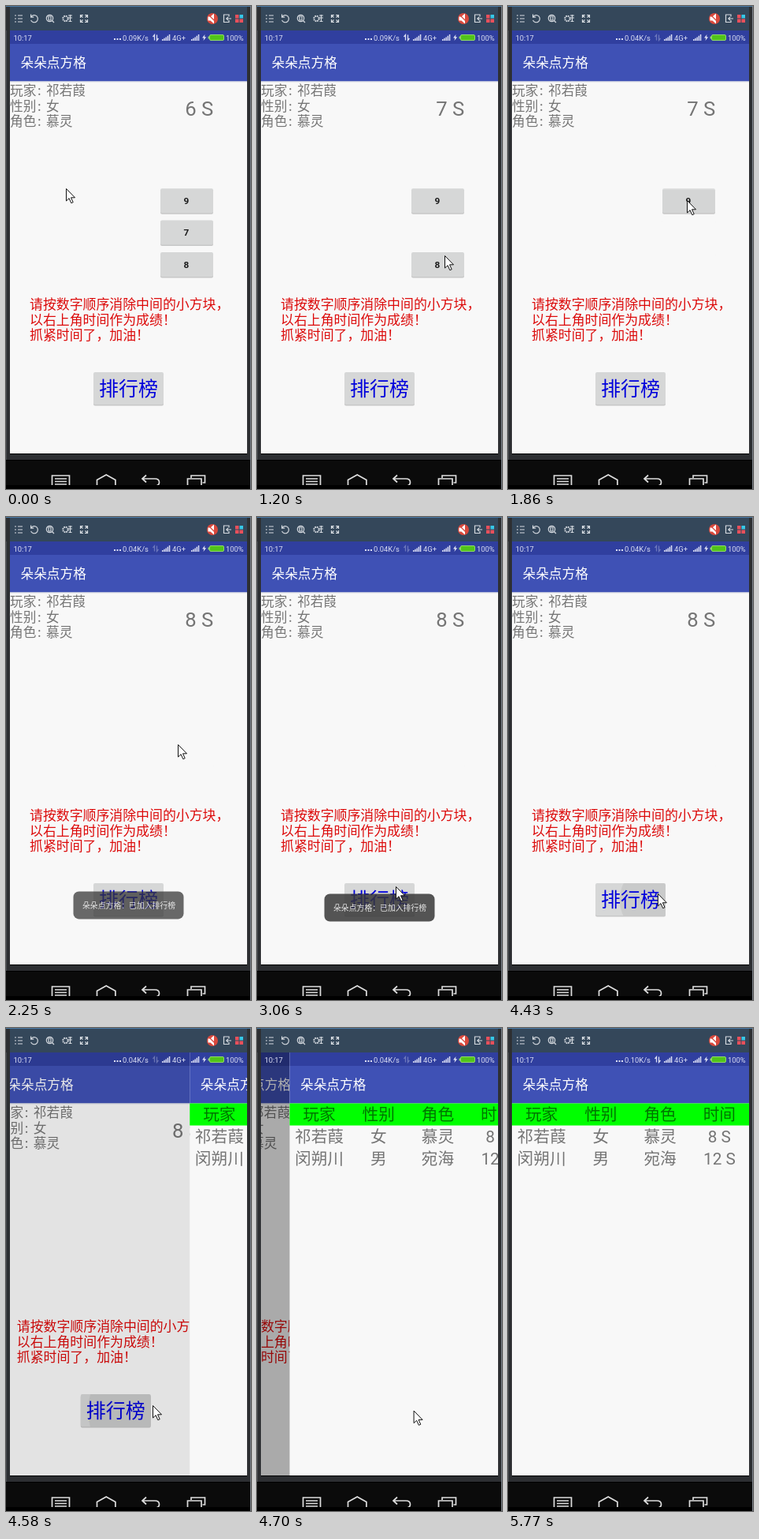
Write an HTML page that moves like this. It is 311 px wide and 612 px high and loops after 5890 ms.

```html
<!DOCTYPE html>
<html lang="zh-CN">
<head>
<meta charset="utf-8">
<title>朵朵点方格</title>
<style>
  html, body { margin: 0; width: 100%; height: 100%; overflow: hidden; background: #2d2f32; }
  svg { display: block; }
  text { font-family: "Noto Sans CJK SC", "Noto Sans CJK", sans-serif; white-space: pre; }
  .latin { font-family: Roboto, "Noto Sans CJK SC", sans-serif; }
  .title { font-size: 16.7px; fill: #fff; }
  .info { font-size: 16.7px; fill: #757575; }
  .hint { font-size: 16.9px; fill: #dc0a0a; }
  .count { font-size: 25.7px; fill: #757575; }
  .digit { font-size: 11.8px; font-weight: 700; fill: #1c1c1c; text-anchor: middle; }
  .rank { font-size: 25px; fill: #0000dc; }
  .cell { font-size: 20.7px; fill: #757575; text-anchor: middle; }
  .head { fill: #000; fill-opacity: .54; }
  .status { font-size: 9.4px; fill: #dcdff4; }
  .toast { font-size: 9.85px; fill: #e8e8e8; }
  .button { fill: #d6d7d7; }
  .shadow { fill: #000; fill-opacity: .2; }
  .line { fill: none; stroke: #d5dae0; stroke-width: 1.2; }
  .nav { fill: none; stroke: #dedede; stroke-width: 1.7; }
</style>
</head>
<body>
<svg width="311" height="612" viewBox="0 0 311 612">
  <defs>
    <clipPath id="screen"><rect x="5" y="31" width="301" height="536"/></clipPath>
    <clipPath id="rankClip"><rect x="111" y="464" width="89" height="41" rx="2"/></clipPath>
    <clipPath id="navClip"><rect y="575" width="311" height="32"/></clipPath>
    <path id="signal" fill="#dcdff4" d="M0 8V6h1.5v2zM2.2 8V4.8h1.5V8zM4.4 8V3.4h1.5V8zM6.6 8V1.8h1.5V8zM8.8 8V0h1.5v8z"/>
    <g id="bars">
      <path fill="#303f9f" d="M5 31h301v17H5z"/>
      <path fill="#3f51b5" d="M5 48h301v47.5H5z"/>
      <text class="title" x="18.5" y="78">朵朵点方格</text>
    </g>
  </defs>

  <!-- window frame and tools -->
  <path fill="#2d2f32" d="M0 0h311v612H0z"/>
  <path fill="#34475a" d="M5 1h301v30H5z"/>
  <path fill="#4a7ba6" d="M0 0h311v1H0z"/>
  <path fill="#45484d" d="M0 31h1v544H0z"/>
  <path class="line" d="M11 12h2M15 12h6M11 16h2M15 16h6M11 20h2M15 20h6"/>
  <path class="line" d="M32 13.5a4.6 4.6 0 1 1-.4 4.6M31.6 10.5v3.6h3.6"/>
  <g class="line"><circle cx="55.5" cy="15.5" r="4.2"/><path d="M58.5 18.5l2.5 2.5M54 18v-5h3v5z"/></g>
  <g class="line">
    <circle cx="75.5" cy="16" r="3.2" stroke-width="2" stroke-dasharray="1.7 .8"/>
    <path d="M79 12h5M79 15h5M81.5 11v9M79.5 19.5h4"/>
  </g>
  <path class="line" d="M94.5 15v-3.5H98M100 11.5h3.5V15M103.5 17v3.5H100M98 20.5h-3.5V17M95 12l2.5 2.5M103 12l-2.5 2.5M103 20l-2.5-2.5M95 20l2.5-2.5"/>
  <circle cx="262" cy="16" r="7" fill="#d8483c"/>
  <path fill="#fff" d="M256.500 13.500h3l4.500-4v13l-4.500-4h-3z"/>
  <path d="M257 11l10 10" stroke="#d8483c" stroke-width="1.3"/>
  <path class="line" d="M283 13.500V11h-6.500v9.500h6.500V18M286 16h-6M282 13.800L279.800 16l2.200 2.200"/>
  <path fill="#e8505b" d="M291 11h4.500v4.500H291zM291 16.500h4.500V21H291zM296.500 16.500h4.500V21h-4.500z"/>
  <path fill="#35c8e8" d="M296.500 11h4.500v4.500h-4.500z"/>

  <g clip-path="url(#screen)">
    <g id="game">
      <path fill="#f8f8f8" d="M5 31h301v536H5z"/>
      <use href="#bars"/>
      <path fill="#dcdde4" d="M5 95.500h301v1H5z"/>
      <g id="info"></g>
      <text id="count" class="latin count" x="227.3" y="139"></text>
      <g id="tiles"></g>
      <g id="hints"></g>
      <rect class="shadow" x="111" y="465.500" width="89" height="41" rx="2"/>
      <rect class="button" x="111" y="464" width="89" height="41" rx="2"/>
      <circle id="ripple" cx="186" cy="485" fill-opacity=".06" clip-path="url(#rankClip)"/>
      <text class="rank" x="118" y="494">排行榜</text>
    </g>
    <rect id="shade" x="5" y="31" width="301" height="536"/>
    <g id="board">
      <path fill="#f8f8f8" d="M5 31h301v536H5z"/>
      <use href="#bars"/>
      <path fill="#0f0" d="M5 95.500h301v28H5z"/>
      <g id="table"></g>
    </g>
    <g id="toast">
      <rect x="85.500" y="477.500" width="140" height="35" rx="7" fill="#383838" fill-opacity=".85"/>
      <text class="toast" x="97" y="499">朵朵点方格：已加入排行榜</text>
    </g>

    <text class="latin status" x="9.500" y="43.500">10:17</text>
    <path fill="#dcdff4" d="M137 41h2v2h-2zM140.500 41h2v2h-2zM144 41h2v2h-2z"/>
    <text id="speed" class="latin status" x="148" y="43.500"></text>
    <path id="arrows" d="M188.500 43.500v-7l-2 2.500M191.500 36.500v7l2-2.500" fill="none" stroke="#dcdff4" stroke-width="1.3"/>
    <use href="#signal" x="198" y="36"/>
    <text class="latin status" x="211" y="43.500">4G+</text>
    <use href="#signal" x="235" y="36"/>
    <path fill="#dcdff4" d="M252.500 36l-3.500 4.500h2.200L250.500 44l3.700-4.700H252z"/>
    <rect x="258.500" y="36.500" width="18" height="7" rx="1.5" fill="#52c41a" stroke="#8fd868"/>
    <path fill="#8fd868" d="M256.500 38.500h1.500v3h-1.500z"/>
    <text class="latin status" x="279" y="43.500">100%</text>
  </g>

  <!-- navigation keys -->
  <path d="M5 567h301v1H5zM0 575h311v37H0z"/>
  <path fill="#0b0b0b" d="M0 576h311v31H0z"/>
  <g class="nav" clip-path="url(#navClip)">
    <path d="M58.500 610v-15h22v15M62 599h15M62 602.500h15M62 606h15"/>
    <path d="M115.500 610v-9.500l11.700-6.500 11.700 6.500v9.500"/>
    <path d="M178 594.500l-5 4.500 5 4.500M173 599h16q5.500 0 5.500 4.500t-5.500 4.500"/>
    <path d="M235 598v-3h17.500v9h-3M230.500 610v-11h17.500v11"/>
  </g>
  <path fill="#7d838b" d="M310 0h1v612h-1z"/>

  <path id="cursor" d="M.5.5v15.500l3.600-3.300 2.700 6 2.400-1-2.700-5.900h5z" fill="#fff" stroke="#111"/>
</svg>

<script>
const LOOP = 5890;
const BEAT = 134.2;   // motion is shown in steps of one beat
const GLIDE = 330;    // longest time the pointer takes to reach a stop

const $ = id => document.getElementById(id);
const set = (el, attrs) => {
  for (const key in attrs) el.setAttribute(key, attrs[key]);
};
const add = (id, markup) => {
  $(id).insertAdjacentHTML("beforeend", markup);
  return $(id).lastElementChild;
};
const label = (cls, x, y, text) => `<text class="${cls}" x="${x}" y="${y}">${text}</text>`;

// Eased progress from 0 to 1
const ease = (t, from, to) => {
  const p = Math.min(1, Math.max(0, (t - from) / (to - from)));
  return p * p * (3 - 2 * p);
};

// Pointer stops: arrival time, x, y
const stops = [
  [0, 76, 231], [390, 272, 298], [670, 247, 285], [1200, 238, 316], [1710, 227, 246],
  [2250, 218, 288], [2660, 213, 488], [2950, 176, 468], [3600, 197, 475],
  [4560, 186, 478], [4690, 198, 484], [4830, 279, 562]
];

function pointer(t) {
  let [last, x, y] = stops[0];
  for (const [time, nextX, nextY] of stops.slice(1)) {
    const p = ease(t, Math.max(last, time - GLIDE), time);
    x += (nextX - x) * p;
    y += (nextY - y) * p;
    last = time;
  }
  return [x, y];
}

["玩家 祁若葭", "性别 女", "角色 慕灵"].forEach((line, i) => {
  const [name, value] = line.split(" ");
  const y = 113 + i * 19.6;
  add("info", label("info", 5, y, name) + label("info", 40, y, ":") + label("info", 51, y, value));
});

["请按数字顺序消除中间的小方块，", "以右上角时间作为成绩！", "抓紧时间了，加油！"]
  .forEach((line, i) => add("hints", label("hint", 30, 384 + i * 19.7, line)));

[
  ["玩家", "性别", "角色", "时间"],
  ["祁若葭", "女", "慕灵", "8 S"],
  ["闵朔川", "男", "宛海", "12 S"]
].forEach((row, r) => row.forEach((text, c) => {
  const cls = `cell ${r ? "" : "head"} ${text.endsWith("S") ? "latin" : ""}`;
  add("table", label(cls, 42.6 + c * 75.25, 117.3 + r * 28, text));
}));

const tapTimes = { 7: 810, 8: 1470, 9: 1860 };
const tiles = [9, 7, 8].map((value, i) => {
  const y = 231.3 + i * 40.3;
  const el = add("tiles", `<g>
    <rect class="shadow" x="196" y="${y + 1.5}" width="67" height="31" rx="2"/>
    <rect class="button" x="196" y="${y}" width="67" height="31" rx="2"/>
    ${label("latin digit", 229, y + 19.7, value)}</g>`);
  return { el, face: el.querySelector(".button"), tap: tapTimes[value] };
});

function draw(t) {
  const step = Math.floor((t + 34) / BEAT) * BEAT;

  set($("cursor"), {
    visibility: t < 5000 ? "visible" : "hidden",
    transform: `translate(${pointer(step)})`
  });

  for (const { el, face, tap } of tiles) {
    set(el, { visibility: t < tap + 120 ? "visible" : "hidden" });
    set(face, { "fill-opacity": t < tap ? 1 : .85 });
  }
  $("count").textContent = Math.min(8, 6 + Math.floor((t + 40) / 1000)) + " S";
  $("speed").textContent = (t < 1590 ? "0.09" : t < 5650 ? "0.04" : "0.10") + "K/s";
  set($("arrows"), { opacity: t < 1590 || t >= 5770 ? 1 : .35 });

  set($("toast"), {
    opacity: ease(step, 2070, 2340) - ease(step, 4030, 4430),
    transform: `translate(0 ${6 * ease(step, 2070, 2500) - 6})`
  });
  set($("ripple"), { r: 66 * ease(step, 4200, 4570) });

  const slide = ease(step, 4470, 4760);
  set($("board"), { transform: `translate(${301 * (1 - slide)} 0)` });
  set($("game"), { transform: `translate(${-67 * slide} 0)` });
  set($("shade"), { opacity: .36 * slide });
}

const start = performance.now();
function tick() {
  draw((performance.now() - start) % LOOP);
  requestAnimationFrame(tick);
}
tick();
</script>
</body>
</html>
```
